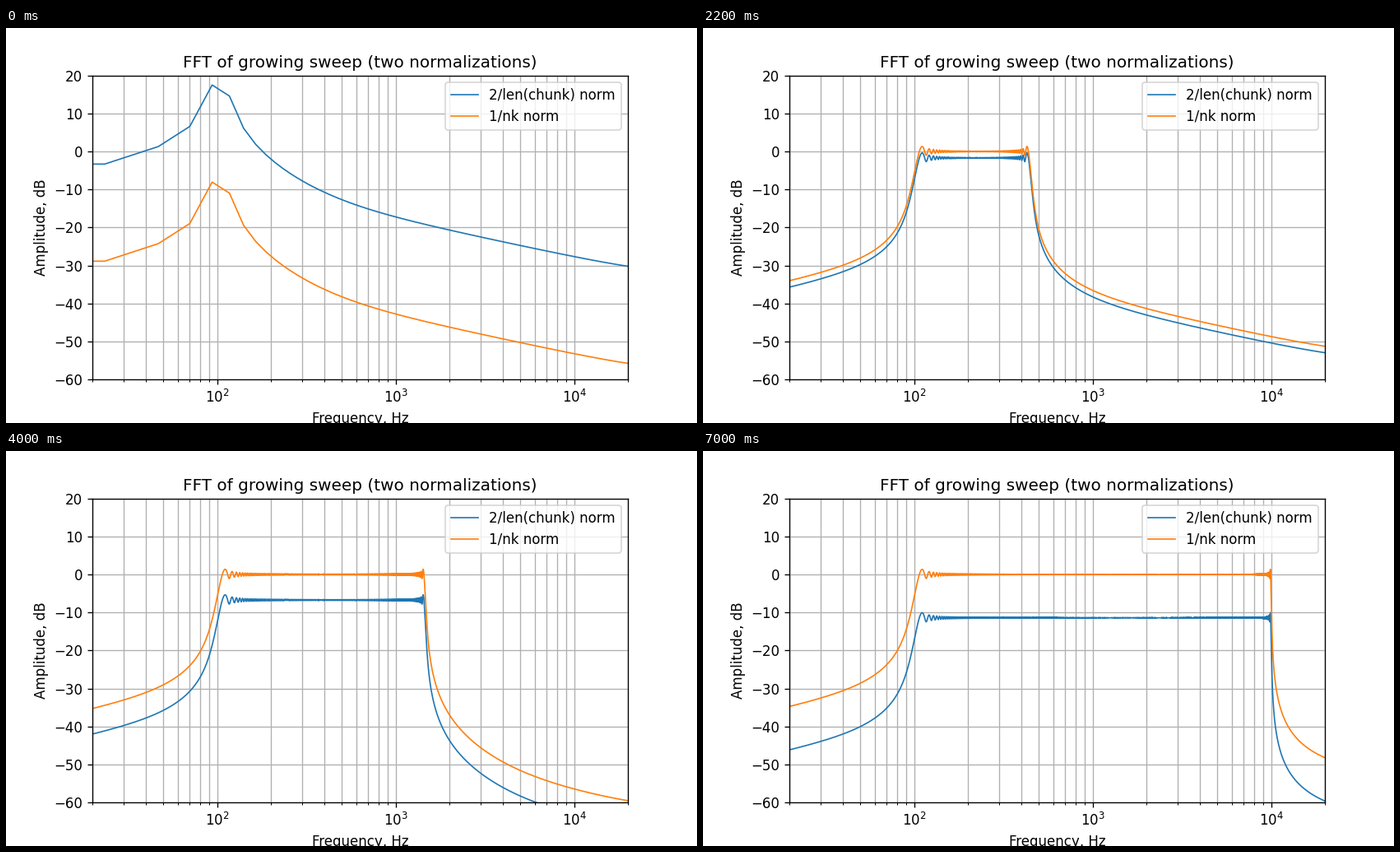
Animation of 840x480 px, one loop 7100 ms. Source, as a matplotlib script:

```python
import numpy as np
import matplotlib.pyplot as plt
from matplotlib.animation import FuncAnimation

RATE = 96000            # samples per second
DURATION = 3.0          # sweep length, seconds
F_LOW, F_HIGH = 100.0, 10000.0
BLOCK = 4096            # samples added per step
F_MIN, F_MAX = 20, 20000
INTERVAL = 100          # ms

total = int(RATE * DURATION)
steps = -(-total // BLOCK)

# Exponential sine sweep
growth = DURATION / np.log(F_HIGH / F_LOW)
time = np.arange(total) / RATE
sweep = np.sin(2 * np.pi * F_LOW * growth * np.expm1(time / growth))

# Level of the sweep's spectrum once it is weighted by sqrt(f)
nk = RATE / 2 * np.sqrt(growth)


def spectrum(step):
    """Frequencies, weighted magnitudes and length of the growing chunk."""
    chunk = sweep[:(step + 1) * BLOCK]
    size = len(chunk)
    freqs = np.fft.rfftfreq(size, 1 / RATE)
    mags = np.abs(np.fft.rfft(chunk)) * np.sqrt(freqs)
    # Carry the first bin level to the left edge of the log axis
    freqs[0], mags[0] = 1, mags[1]
    keep = freqs < F_MAX * 1.05
    return freqs[keep], mags[keep], size


def decibels(x):
    return 20 * np.log10(np.maximum(x, 1e-12))


fig, ax = plt.subplots(figsize=(7, 4), dpi=120)
ax.set_xscale("log")
ax.set_xlim(F_MIN, F_MAX)
ax.set_ylim(-60, 20)
ax.set_title("FFT of growing sweep (two normalizations)")
ax.set_xlabel("Frequency, Hz")
ax.set_ylabel("Amplitude, dB")
ax.grid(which="both")

chunk_line, = ax.plot([], [], linewidth=1, label="2/len(chunk) norm")
nk_line, = ax.plot([], [], linewidth=1, label="1/nk norm")
ax.legend(loc="upper right")


def draw(step):
    freqs, mags, size = spectrum(step)
    chunk_line.set_data(freqs, decibels(mags * 2 / size))
    nk_line.set_data(freqs, decibels(mags / nk))
    return chunk_line, nk_line


def start():
    return draw(0)


anim = FuncAnimation(fig, draw, frames=steps, init_func=start,
                     interval=INTERVAL, repeat=True, repeat_delay=0)
plt.show()
```
